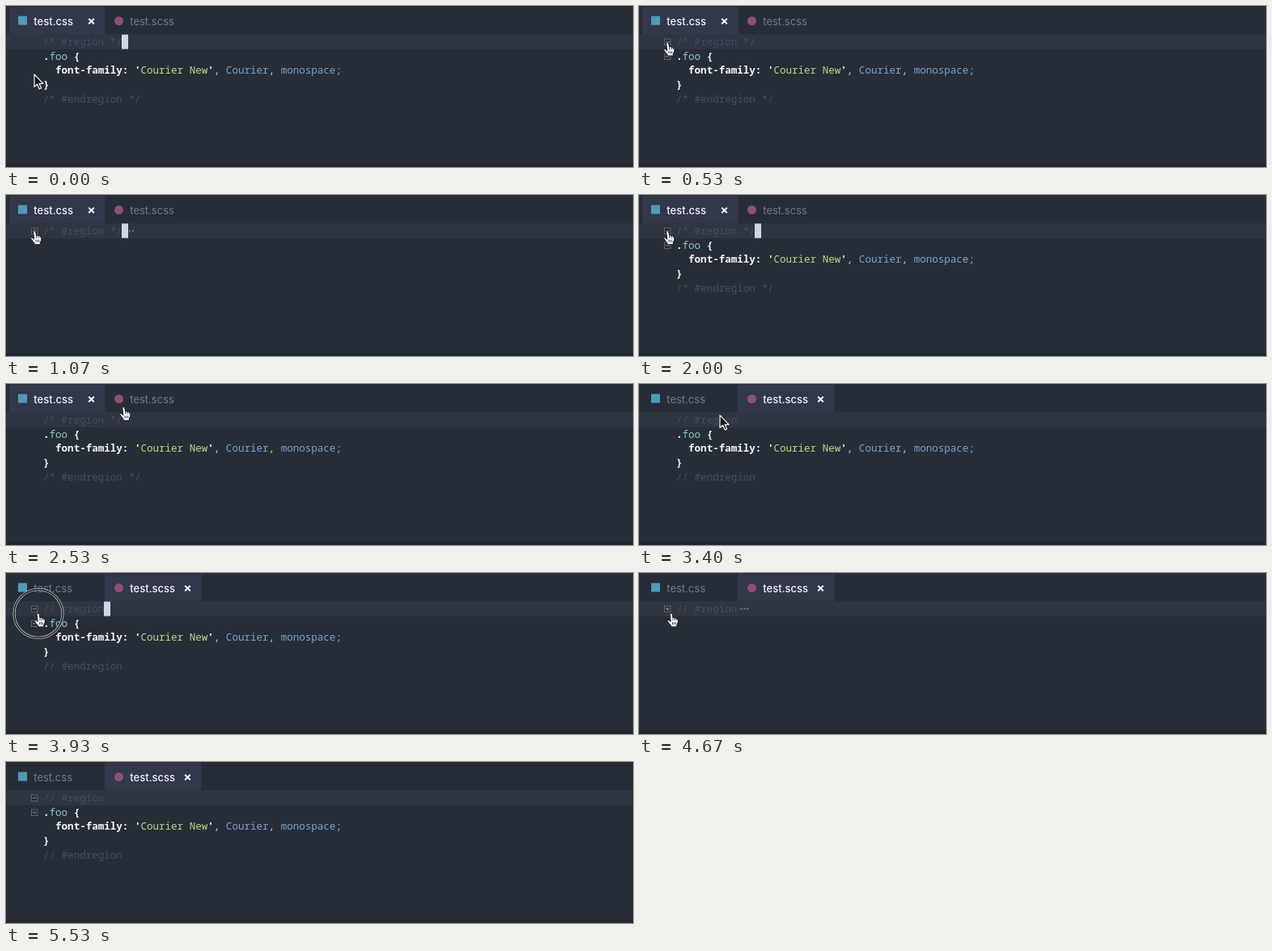
Animation, 775 px wide and 200 px high, one loop 5.59 s. Source, as an HTML page:

```html
<!DOCTYPE html>
<html lang="en">
<head>
<meta charset="utf-8">
<title>Region folding</title>
<style>
  html, body { margin: 0; width: 100%; height: 100%; overflow: hidden; background: #272d37; }
  svg { display: block; }
  text { white-space: pre; }
  .tab { font: 400 13px Inter, Roboto, sans-serif; fill: #737886; }
  .tab.active { font-weight: 500; fill: #f2f4f8; }
  .code { font: 600 12.56px "Noto Sans Mono", "DejaVu Sans Mono", monospace; fill: #f4f6f8; }
  .comment { font-weight: 400; fill: #454c62; }
  .name, .string, .value, .comma { font-weight: 500; }
  .name { fill: #8fc8c0; }
  .string { fill: #b9d78c; }
  .value { fill: #7ca2d0; }
  .comma { fill: #a9cbd6; }
  .box { fill: #272d37; stroke: #5d626e; }
  .sign { fill: none; stroke: #8b909b; }
</style>
</head>
<body>
<svg width="775" height="200" viewBox="0 0 775 200">
  <rect width="775" height="200" fill="#272d37"/>
  <rect y="196" width="775" height="4" fill="#20252e"/>
  <rect id="tabBack" y="1" height="34" fill="#32374a"/>
  <rect x="15" y="12.5" width="11" height="11" fill="#519aba"/>
  <circle cx="139.5" cy="18.5" r="5.5" fill="#8d4f77"/>
  <text id="cssTab" class="tab" x="34.3" y="23.7">test.css</text>
  <text id="scssTab" class="tab" x="153.3" y="23.7">test.scss</text>
  <path id="close" d="M-3.3 -3.3 L3.3 3.3 M3.3 -3.3 L-3.3 3.3" stroke="#f4f6f8" stroke-width="2"/>

  <rect x="-1" y="36" width="777" height="17" fill="#2f3441" stroke="#343947"/>
  <text id="opening" class="code comment" x="46" y="48.5"></text>
  <g id="body">
    <text class="code" x="46" y="66.5">.<tspan class="name">foo</tspan> {</text>
    <text class="code" x="46" y="84.3">  font-family: '<tspan class="string">Courier New</tspan>'<tspan class="comma">,</tspan> <tspan class="value">Courier</tspan><tspan class="comma">,</tspan> <tspan class="value">monospace;</tspan></text>
    <text class="code" x="46" y="102.3">}</text>
    <text id="ending" class="code comment" x="46" y="120"></text>
  </g>
  <g id="dots" fill="#858b9b">
    <circle cx="5" cy="44.5" r="1"/><circle cx="9" cy="44.5" r="1"/><circle cx="13" cy="44.5" r="1"/>
  </g>
  <g id="minuses">
    <rect class="box" x="31.5" y="41" width="7.5" height="7.5"/><path class="sign" d="M33 44.7h4.5"/>
    <rect class="box" x="31.5" y="59" width="7.5" height="7.5"/><path class="sign" d="M33 62.7h4.5"/>
  </g>
  <g id="plus">
    <rect class="box" x="31.5" y="41" width="7.5" height="7.5"/><path class="sign" d="M33 44.7h4.5M35.25 42.5v4.5"/>
  </g>
  <rect id="caret" y="35.5" width="8" height="18" fill="#ced7e6"/>

  <g id="pointer">
    <g id="ring" fill="none">
      <circle r="30" stroke="#b9bec5" stroke-width="3.2"/>
      <circle r="30" stroke="#15191f" stroke-width="1.5"/>
    </g>
    <path id="arrow" d="M0 0V15.4L3.6 12.2L6.2 18L8.6 17L6.1 11.4H11Z" fill="#15181d" stroke="#f4f4f4" stroke-width="1.2" stroke-linejoin="round"/>
    <g id="hand" stroke="#15181d" stroke-linejoin="round">
      <path d="M-1.8 1Q-1.7 -.4 -.4 -.4Q.9 -.4 1.2 1L2 5.2Q3.6 4.4 4.4 5.6Q6 5 6.6 6.4Q8.4 6.2 8.4 8.2Q8.5 11.7 6.8 13.7V16.4H-.5V14.7Q-3 12.2 -5 8.7Q-4.7 7 -2.8 8.2L-.8 10Z" fill="#fff"/>
      <path d="M2 5.2V8.5M4.4 5.6V8.5M6.6 6.4V8.5M1.4 10.5V13.6M3.3 10.5V13.6M5.2 10.5V13.6" fill="none" stroke-width=".8"/>
    </g>
  </g>
</svg>
<script>
const LOOP = 5590;
const SWITCH = 2800;
const CHAR = 7.53;
const FOLDS = [[860, 1530], [4070, 4950]];
const CLICKS = [[730, 980], [1400, 1650], [2800, 3080], [3870, 4200]];
const POINTER_GONE = 5000;

// Keys are [time, value...]
const PATH = [[0, 35, 85], [120, 35, 85], [560, 35.5, 45], [2100, 35.5, 45], [2700, 172, 25],
              [3120, 172, 25], [3650, 40, 50.5]];
const HOVER = [[70, 0], [300, 1], [2250, 1], [2550, 0], [3450, 0], [3650, 1]];

const el = id => document.getElementById(id);
const show = (id, opacity) => el(id).setAttribute("opacity", Number(opacity));
const place = (id, x, y) => el(id).setAttribute("transform", `translate(${x} ${y})`);
const within = (t, [from, to]) => t >= from && t < to;
const clamp = v => Math.max(0, Math.min(1, v));
const ease = u => u * u * (3 - 2 * u);

function sample(keys, t) {
  const next = keys.findIndex(key => key[0] > t);
  if (next === 0) return keys[0].slice(1);
  if (next < 0) return keys[keys.length - 1].slice(1);
  const a = keys[next - 1], b = keys[next];
  const u = ease((t - a[0]) / (b[0] - a[0]));
  return a.slice(1).map((v, i) => v + (b[i + 1] - v) * u);
}

function drawEditor(t) {
  const scss = t >= SWITCH;
  const folded = FOLDS.some(span => within(t, span));
  const comment = word => scss ? `// #${word}` : `/* #${word} */`;
  const opening = comment("region");
  const lineEnd = 46 + opening.length * CHAR;

  el("tabBack").setAttribute("x", scss ? 122 : 4);
  el("tabBack").setAttribute("width", scss ? 119.5 : 118.5);
  el("cssTab").classList.toggle("active", !scss);
  el("scssTab").classList.toggle("active", scss);
  place("close", scss ? 224.5 : 105.5, 19);

  el("opening").textContent = opening;
  el("ending").textContent = comment("endregion");
  show("body", !folded);
  show("dots", folded);
  show("plus", folded);
  show("minuses", folded ? 0 : sample(HOVER, t)[0]);
  place("dots", lineEnd, 0);

  // Blinking restarts when the file changes
  const blink = (scss ? t - SWITCH : t) % 1000;
  el("caret").setAttribute("x", Math.floor(lineEnd));
  show("caret", blink < 500);
}

function drawPointer(t) {
  const [x, y] = sample(PATH, t);
  const overButton = y < 35 || (y < 52 && x < 43);
  const click = CLICKS.find(span => within(t, span));
  place("pointer", x, y);
  show("pointer", t < POINTER_GONE);
  show("hand", overButton);
  show("arrow", !overButton);
  show("ring", click ? clamp((click[1] - t) / 100) : 0);
}

function frame(now) {
  const t = now % LOOP;
  drawEditor(t);
  drawPointer(t);
  requestAnimationFrame(frame);
}
frame(0);
</script>
</body>
</html>
```
